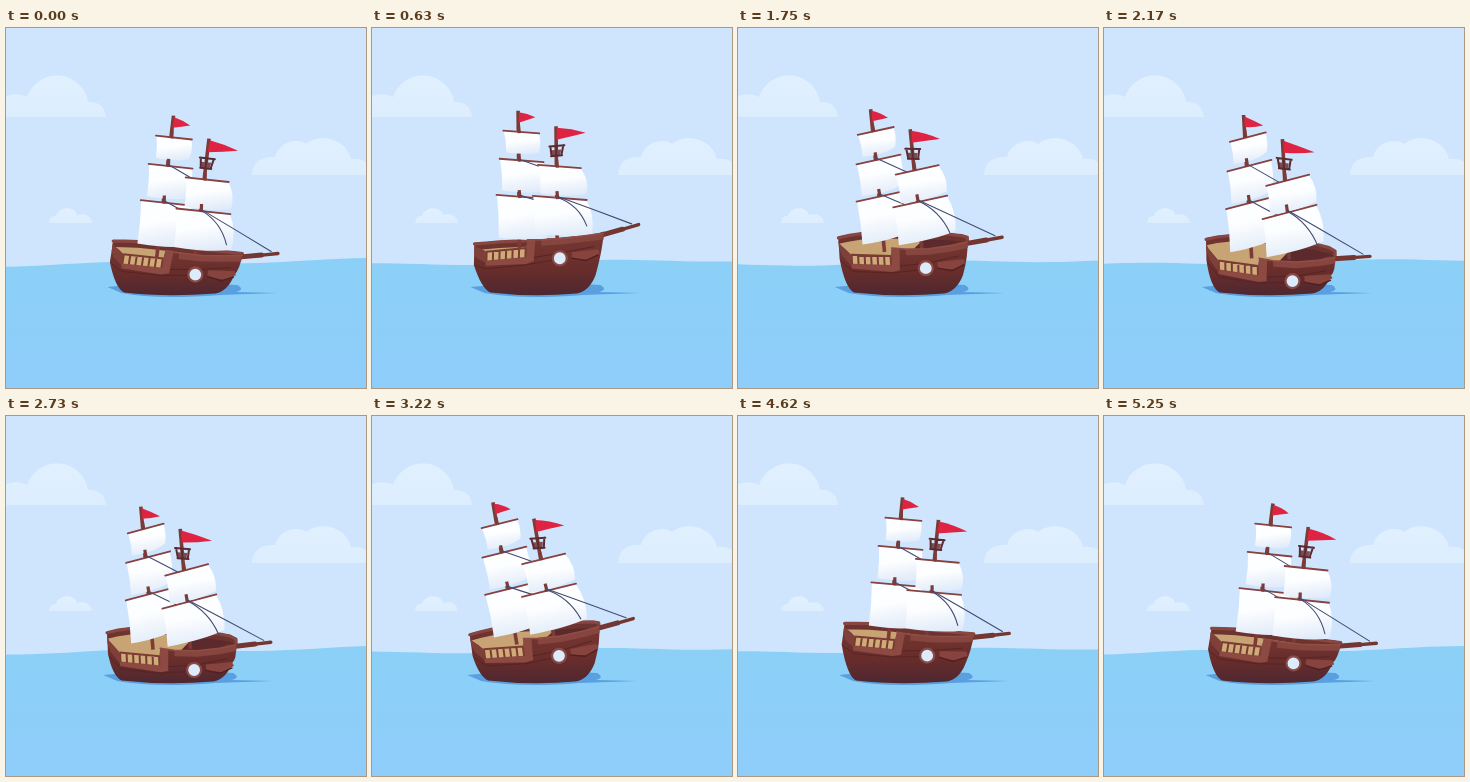
Recreate the animation shown at these times as an HTML page. Size 360 by 360 pixels, loop 5.32 s.

```html
<!DOCTYPE html>
<html lang="en">
<head>
<meta charset="utf-8">
<title>Sailing ship</title>
<style>
  html, body { margin: 0; width: 100%; height: 100%; overflow: hidden; background: #cfe5fe; }
  svg { display: block; width: 100vw; height: 100vh; }
</style>
</head>
<body>
<svg id="stage" viewBox="0 0 360 360">
  <defs>
    <linearGradient id="sea" x1="0" y1="0" x2="0" y2="1">
      <stop offset="0" stop-color="#8bd0f7"/>
      <stop offset="1" stop-color="#8fcdfb"/>
    </linearGradient>
    <linearGradient id="cloth" x1=".3" y1="0" x2=".5" y2="1">
      <stop offset=".45" stop-color="#fdfeff"/>
      <stop offset="1" stop-color="#e1ebf9"/>
    </linearGradient>
    <linearGradient id="wood" x1="0" y1="0" x2="0" y2="1">
      <stop offset="0" stop-color="#783833"/>
      <stop offset=".6" stop-color="#672d2b"/>
      <stop offset="1" stop-color="#4e2731"/>
    </linearGradient>
    <linearGradient id="mist" x1="0" y1="0" x2="0" y2="1">
      <stop offset="0" stop-color="#e1f0fe"/>
      <stop offset="1" stop-color="#dcedfe"/>
    </linearGradient>
  </defs>
  <rect width="360" height="360" fill="#cfe5fe"/>
  <g fill="url(#mist)">
    <path d="M0 89V68Q12 64 21 69A31.5 31.5 0 0 1 82 74Q98 73 100 89Z"/>
    <path d="M43 195Q44 187 50 188C53 178 69 178 71 187Q84 184 86 195Z"/>
    <path d="M246 147Q247 128 269 129C272 114 292 109 300 116C313 105 340 110 345 131Q354 130 360 134V147Z"/>
  </g>
</svg>
<script>
const LOOP = 5320, STEP = 70, TAU = Math.PI * 2;
const stage = document.getElementById('stage');
const parts = [];
let pitch, heave, roll, phase;

// Adds a path whose outline is rebuilt from the current pose.
function part(outline, style) {
  const node = document.createElementNS('http://www.w3.org/2000/svg', 'path');
  const attrs = { fill: 'none', 'stroke-linejoin': 'round', ...style };
  for (const key in attrs) node.setAttribute(key, attrs[key]);
  stage.append(node);
  parts.push({ node, outline });
}
const line = (stroke, width, cap = 'round') =>
  ({ stroke, 'stroke-width': width, 'stroke-linecap': cap });

// Ship space: x along the keel, y down, z across the beam (far side positive).
function place(x, y, z = 0) {
  return [
    x + z + pitch * (.085 * (y - 208) - 3.6) + roll * (3.2 + .097 * (210 - y)),
    y + z * (.185 * roll - .08) - pitch * .144 * (x - 173.5) + 9.5 * heave - 1.5 * roll
  ];
}
const at = (...p) => place(...p).map(v => v.toFixed(2)).join(' ');
const poly = pts => 'M' + pts.map(p => at(...p)).join('L');
const closed = pts => poly(pts) + 'Z';

// Sea and shadow
const horizon = x => 237 - x / 68 + 1.7 * Math.cos(TAU * (x / 240 - phase * 4));
part(() => {
  let d = 'M0 360';
  for (let x = 0; x <= 360; x += 12) d += `L${x} ${horizon(x).toFixed(2)}`;
  return d + 'L360 360Z';
}, { fill: 'url(#sea)' });
part(() => {
  const s = 2 * roll - 2 * pitch;
  return `M${98 + s} 259Q160 252 ${228 + s} 257Q${236 + s} 262 ${226 + s} 264` +
    `L${268 + s} 265L${210 + s} 267Q150 272 ${112 + s} 265Z`;
}, { fill: '#5a9fe0' });

// Deck
const stern = [102, 212, 0], bow = [231, 214, 0];
const farRail = [stern, [106, 211, 7], [114, 210, 13], [130, 210, 19], [160, 211, 23], [190, 211, 22],
  [207, 211, 18], [220, 211, 11], bow];
const fence = [[133, 225, -19], [174, 225, -20]];
const nearRail = [stern, [106, 215, -4], [113, 218, -9], [124, 221, -15], ...fence,
  [175, 217, -20], [188, 218, -19], [207, 218, -15], [222, 216, -8], bow];
const lowered = (pts, dy) => pts.map(([x, y, z]) => [x, y + dy, z]);
part(() => closed([...farRail, ...[...nearRail].reverse()]), { fill: '#c8a373' });
part(() => closed([[172, 211, 23], ...farRail.slice(5), [207, 222, -15], [188, 224, -18]]), { fill: '#5c2a2c' });
part(() => closed([...farRail, ...lowered(farRail, 7).reverse()]), { fill: '#6d332f' });
part(() => poly(lowered(farRail, 1)), line('#874640', 3.2));

// Rigging
const MAST = '#7d3b37', ROPE = '#444a70';
const rear = { x: 141.7, top: 83.4, bulge: 0, yards: [[105, 17.5, 22], [133.5, 21.5, 32], [170, 25, 43]] };
const fore = { x: 180.2, top: 102.4, bulge: 6, yards: [[143, 21, 29], [174.5, 26.5, 38]] };
const mastX = (mast, y) => mast.x + .04 * (y - mast.top);

function sail(mast, [y, half, drop]) {
  const x = mastX(mast, y) + 3, low = y + drop, { bulge } = mast;
  part(() => `M${at(x, y, -half)}L${at(x, y, half)}` +
    `Q${at(x + 3 + bulge, y + drop * .4, half)} ${at(x + 1 + bulge, low - 3, half)}` +
    `Q${at(x + 5, low + 2, half * .3)} ${at(x + 3, low, -half)}` +
    `Q${at(x + 3, y + drop * .5, -half)} ${at(x, y, -half)}Z`, { fill: 'url(#cloth)' });
  part(() => poly([[x, y, -half - .5], [x, y, half + .5]]), line('#87413f', 1.8));
}

function flag(mast, length, height, drop) {
  part(() => {
    const flap = Math.sin(TAU * phase * 8);
    const y = mast.top + 1.5, x = mast.x + 1;
    const reach = length + 1.5 * flap;
    return `M${at(x, y)}Q${at(x + reach * .5, y + drop * .3 + flap)} ${at(x + reach, y + drop)}` +
      `Q${at(x + reach * .5, y + height * .85 + flap)} ${at(x, y + height)}Z`;
  }, { fill: '#df2443' });
}

function rig(mast, foot) {
  part(() => poly([[mast.x, mast.top], [mastX(mast, foot), foot]]), line(MAST, 3.6, 'butt'));
  [...mast.yards].reverse().forEach(yard => sail(mast, yard));
  mast.yards.forEach(([y]) => {
    const x = mastX(mast, y);
    part(() => poly([[x, y - 7], [x + 1, y + 1]]), line(MAST, 3.2, 'butt'));
  });
}

function rope(from, bend, to) {
  part(() => `M${at(...from)}Q${at(...bend)} ${at(...to)}`, line(ROPE, 1.1));
}

rig(rear, 226);
flag(rear, 17, 10.5, 6.5);
rope([144, 132], [158, 138], [178, 147]);
rope([146, 168], [160, 174], [178, 181]);
rig(fore, 222);
flag(fore, 29.5, 12, 7.5);

// Crow's nest
const nestX = mastX(fore, 126);
part(() => closed([[nestX - 5, 126], [nestX + 5, 126], [nestX + 4, 132], [nestX - 4, 132]]),
  { fill: '#7d4a50' });
part(() => poly([[nestX - 7, 122], [nestX + 8, 122]]) + poly([[nestX - 5, 132], [nestX + 6, 132]]) +
  [-6, 0, 7].map(o => poly([[nestX + o, 122], [nestX + o * .75, 132]])).join(''), line('#592b30', 2));

rope([184, 174], [205, 183], [214, 205]);

// Bowsprit
part(() => poly([[222, 217], [250, 211.5]]), line('#743631', 5));
part(() => poly([[248, 212], [266, 208.3]]), line('#743631', 3.4));
rope([184, 173], [222, 190], [259, 207]);

// Hull
const hullOutline = () => {
  const [left] = place(103, 230), [right] = place(222, 235);
  const bend = 2 * pitch;
  return poly(nearRail) +
    `Q${at(231, 228)} ${(right + 3 - bend).toFixed(2)} 247` +
    `Q${(right - 3 - bend).toFixed(2)} 263 ${(right - 16 - bend).toFixed(2)} 265.5` +
    `Q160 269.5 ${(left + 14 + bend).toFixed(2)} 264.5` +
    `Q${(left + 5 + bend).toFixed(2)} 260 ${at(102, 234)}Z`;
};
part(hullOutline, { fill: 'url(#wood)' });

// Planks
const plank = (dy, from, to) => part(() =>
  poly([[106, 222 + dy, -3], [133, 229 + dy, -18], [174, 229 + dy, -20], [207, 225 + dy, -15], [226, 220 + dy, -4]].slice(from, to)),
  line('#572422', 1, 'butt'));
plank(7, 1, 5);
plank(13, 0, 4);

// Stern corner, balustrade and side frame
part(() => closed([...nearRail.slice(0, 4), [133, 225, -19], [133, 236, -19], [114, 229, -9], [103, 223, -1]]),
  { fill: '#7f403a' });
part(() => closed([[131, 224, -18], ...fence, [175, 217, -20], [183, 217.5, -20], [182, 239, -20], [174, 241, -20], [132, 239, -18]]),
  { fill: '#8c4a42' });
part(() => closed([...fence, [173, 234, -20], [134, 234, -19]]), { fill: '#cfab78' });
part(() => {
  let d = poly(fence);
  for (let i = 0; i <= 6; i++) d += poly([[134 + i * 6.5, 225, -19.5], [134 + i * 6.5, 234.5, -19.5]]);
  return d;
}, line('#7b3b35', 2, 'butt'));

// Forecastle band and anchor
const foreRail = nearRail.slice(7);
part(() => closed([...foreRail, ...lowered(foreRail, 6).reverse()]), { fill: '#86453e' });
part(() => poly(nearRail.slice(6)), line('#8f4d45', 1.6));
part(() => closed([[212, 232, -12], [230, 230, -4], [231, 234, -3], [224, 240, -7], [212, 238, -12]]),
  { fill: '#87443e' });
part(() => poly([[212, 238, -12], [222, 241, -8], [230, 236, -4]]), line('#4f2022', 1.3));

// Porthole
part(() => {
  const [x, y] = place(203, 237.5, -15), r = 7;
  return `M${x - r} ${y}a${r} ${r} 0 1 0 ${2 * r} 0a${r} ${r} 0 1 0 ${-2 * r} 0Z`;
}, { fill: '#dcecfc', stroke: '#8a4a45', 'stroke-width': 2.2 });

function draw(now) {
  const time = Math.floor((now % LOOP) / STEP) * STEP;
  phase = time / LOOP;
  const wave = phase * 2;
  const sway = Math.cos(TAU * (phase - .985));
  pitch = -Math.cos(TAU * (wave - .88));
  heave = Math.cos(TAU * (wave - .95));
  roll = sway * (1.5 - .5 * sway * sway);
  for (const { node, outline } of parts) node.setAttribute('d', outline());
}

let start;
function tick(now) {
  start ??= now;
  draw(Math.max(0, now - start));
  requestAnimationFrame(tick);
}
draw(0);
requestAnimationFrame(tick);
</script>
</body>
</html>
```
